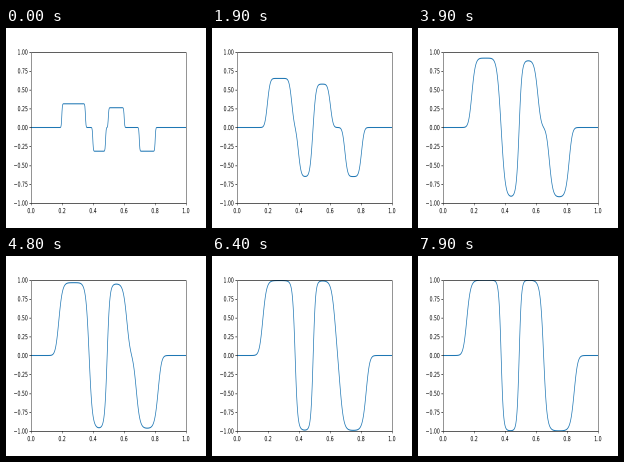
Write a matplotlib script that moves like this. It is 200 px wide and 200 px high and loops after 8000 ms.

```python
import numpy as np
import matplotlib.pyplot as plt
from matplotlib.animation import FuncAnimation
from matplotlib.patches import PathPatch, Polygon, Rectangle
from matplotlib.textpath import TextPath
from matplotlib.transforms import Affine2D

FRAMES, INTERVAL = 80, 100
W, H = 432, 288                        # layout units, squeezed onto a square
X0, X1, Y0, Y1 = 54, 388.8, 36, 253.44
CELLS, SUBSTEPS = 400, 10
DT, EPS2 = 0.05, 1e-4                  # time per frame, squared front width
STEPS = [(0.2, 0.35, 0.3), (0.4, 0.48, -0.3), (0.5, 0.6, 0.25), (0.7, 0.8, -0.3)]

x = np.linspace(0, 1, CELLS + 1)


def solve():
    """Allen-Cahn equation: explicit diffusion, exact reaction."""
    u = np.zeros_like(x)
    for a, b, value in STEPS:
        u[(x > a - 1e-9) & (x < b + 1e-9)] = value
    k = EPS2 * DT / SUBSTEPS * CELLS ** 2
    gain = np.exp(2 * DT / SUBSTEPS)
    states = []
    for _ in range(FRAMES):
        for _ in range(SUBSTEPS):
            u[1:-1] += k * (u[2:] - 2 * u[1:-1] + u[:-2])
            u = u * np.sqrt(gain / (1 + (gain - 1) * u ** 2))
        states.append(u.copy())
    return states


def px(v):
    return X0 + v * (X1 - X0)


def py(v):
    return Y0 + (v + 1) / 2 * (Y1 - Y0)


def snap_x(v):
    return np.floor(v + 0.5) + 0.5


def snap_y(v):
    return H - snap_x(H - v)


def stroke(u, width=1.5):
    """Outline of the curve drawn with a round pen in layout units."""
    pts = np.column_stack([px(x), py(u)])
    d = np.gradient(pts, axis=0)
    n = np.column_stack([-d[:, 1], d[:, 0]])
    n *= width / 2 / np.hypot(*d.T)[:, None]
    return np.vstack([pts + n, (pts - n)[::-1]])


fig = plt.figure(figsize=(2, 2), dpi=100, facecolor="white")
ax = fig.add_axes([0, 0, 1, 1])
ax.set(xlim=(0, W), ylim=(0, H))
ax.axis("off")

LW = 0.9


def bar(left, bottom, width, height):
    ax.add_patch(Rectangle((left, bottom), width, height, fc="black", lw=0,
                           zorder=3, snap=False))


def vline(v, bottom, top):
    bar(snap_x(v) - LW / 2, bottom, LW, top - bottom)


def hline(v, left, right):
    bar(left, snap_y(v) - LW / 2, right - left, LW)


def label(text, cx, cy, side):
    path = TextPath((0, 0), text, size=10, prop={"family": "DejaVu Sans"})
    box = path.get_extents()
    dx = cx - box.x1 - 0.6 if side == "left" else cx - (box.x0 + box.x1) / 2
    dy = cy - 3.65 if side == "left" else cy - 7.6
    path = Affine2D().translate(dx, dy).transform_path(path)
    ax.add_patch(PathPatch(path, fc="black", lw=0, zorder=4, snap=False))


for edge in (X0, X1):
    vline(edge, snap_y(Y0), snap_y(Y1))
for edge in (Y0, Y1):
    hline(edge, snap_x(X0), snap_x(X1))
for v in np.linspace(0, 1, 6):
    vline(px(v), Y0 - 3.5, Y0)
    label(f"{v:.1f}", px(v), Y0 - 7, "below")
for v in np.linspace(-1, 1, 9):
    hline(py(v), X0 - 3.5, X0)
    label(f"{v:.2f}".replace("-", "\u2212"), X0 - 7, py(v), "left")

states = solve()
curve = Polygon(stroke(states[0]), closed=True, fc="#1f77b4", lw=0, zorder=2)
ax.add_patch(curve)
curve.set_clip_path(Rectangle((X0, Y0), X1 - X0, Y1 - Y0, transform=ax.transData))


def update(i):
    curve.set_xy(stroke(states[i]))
    return [curve]


anim = FuncAnimation(fig, update, frames=FRAMES, interval=INTERVAL, repeat=True,
                     repeat_delay=0, blit=False)
plt.show()
```
